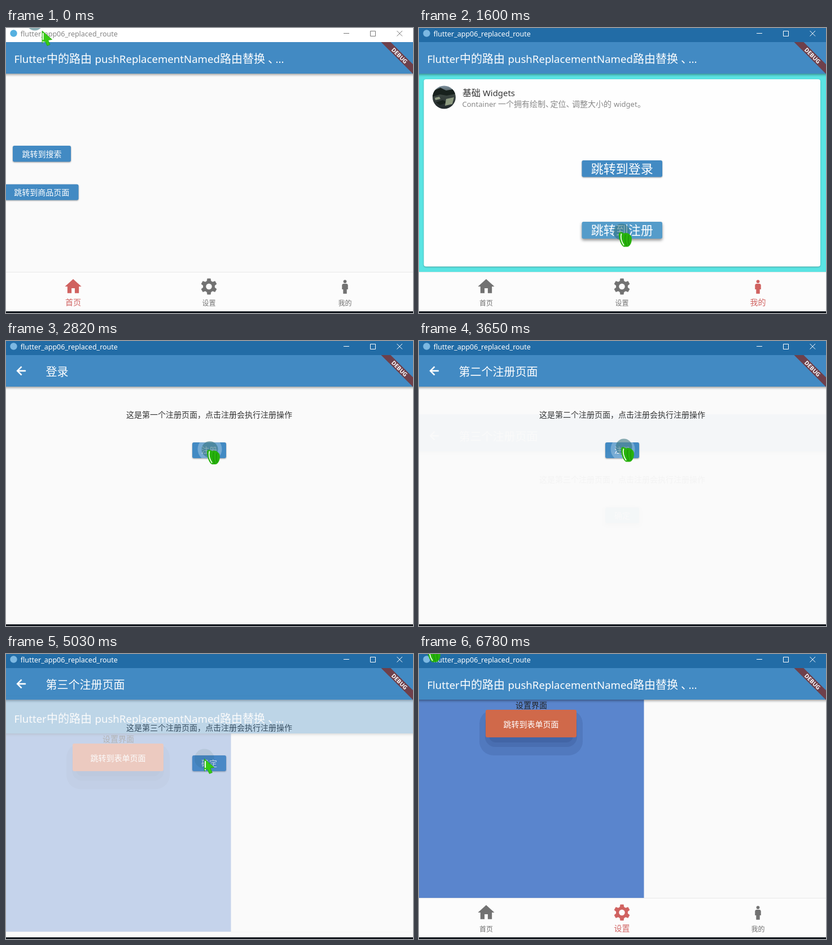
Animation, 721 px wide and 506 px high, one loop 7000 ms. Source, as an HTML page:

```html
<!DOCTYPE html>
<html lang="zh-CN">
<head>
<meta charset="utf-8">
<title>replaced route</title>
<style>
html, body { margin: 0; width: 100%; height: 100%; overflow: hidden; background: #fafafa; }
svg { display: block; width: 721px; height: 506px; }
text { font-family: "Noto Sans CJK SC", "Noto Sans CJK", "Noto Sans", sans-serif; font-weight: 350; white-space: pre; }
.lat { font-family: "Noto Sans", "Open Sans", sans-serif; font-weight: 400; }
.mid { text-anchor: middle; }
.bar { fill: #428ac3; filter: drop-shadow(0 2px 2px rgba(0,0,0,.38)); }
.btn { fill: #428ac3; filter: drop-shadow(0 1.5px 1.2px rgba(0,0,0,.38)); }
.press .hot { fill: #559cca; filter: drop-shadow(0 3px 2.5px rgba(0,0,0,.42)); }
.wave { fill: #fff; opacity: 0; }
.press .wave { opacity: .27; }
.frame rect { fill: #fff; }
.frame text { fill: #858585; }
.frame circle { fill: #55b0e0; }
.frame path { fill: none; stroke: #777; }
.active rect { fill: #226ca6; }
.active text { fill: #fff; }
.active circle { fill: #7cb8e2; }
.active path { stroke: #fff; }
</style>
</head>
<body>
<svg id="stage" viewBox="0 0 721 506">
  <defs>
    <clipPath id="body"><rect y="25" width="721" height="478"/></clipPath>
    <clipPath id="key"><rect x="330" y="180" width="60" height="28" rx="3"/></clipPath>
    <clipPath id="face"><circle cx="44.5" cy="123" r="20.5"/></clipPath>
    <linearGradient id="night" x2="0" y2="1">
      <stop offset="0" stop-color="#8195a4"/><stop offset=".4" stop-color="#3b4540"/>
      <stop offset="1" stop-color="#20272b"/>
    </linearGradient>
    <path id="home" d="M10 20v-6h4v6h5v-8h3L12 3 2 12h3v8z"/>
    <path id="tooth" d="M10.1 2.4h3.8l.8 4.4H9.3z" stroke="currentColor" stroke-width=".4" stroke-linejoin="round"/>
    <g id="gear"><circle cx="12" cy="12" r="5.4" fill="none" stroke="currentColor" stroke-width="3.6"/></g>
    <g id="man">
      <circle cx="12" cy="5.9" r="2"/>
      <path d="M14.2 20.8v-5.3h1.4v-5c0-1.2-.9-2-2-2h-3.2c-1.1 0-2 .8-2 2v5h1.4v5.3z"/>
    </g>
  </defs>

  <g id="pages" clip-path="url(#body)"></g>

  <g transform="translate(721 25) rotate(45)">
    <rect x="-40" y="28" width="80" height="12" fill="#6e404b"/>
    <text class="lat mid" y="37.7" font-size="10.2" style="font-weight:900" fill="#fff">DEBUG</text>
  </g>

  <g id="frame" class="frame">
    <rect width="721" height="25"/>
    <circle cx="13.5" cy="9.5" r="6.2"/>
    <text class="lat" x="25.7" y="14.5" font-size="12.5">flutter_app06_replaced_route</text>
    <path d="M598 9.5h10M645.5 5.500h9v9h-9zM692.500 5l9.500 9.500M702 5l-9.500 9.500"/>
  </g>
  <rect y="503" width="721" height="3" fill="#12171d"/>

  <circle id="halo"/>
  <g id="arrow">
    <path d="M0 0V22L5 18 9 26.500 14 24.500 10.500 16.500 17.500 15.500z" fill="#36cb14" stroke="#23a40a" stroke-width=".8"/>
    <path d="M1.700 4V16M1.700 18.500v2" stroke="#f2fff0" stroke-width="2"/>
  </g>
  <g id="hand">
    <path d="M0 3C2-1 6 0 9 3 12 0 20 3 22.500 9 24 16 21 26 15 26.500H9C3 24 0 12 0 3z" fill="#27b20c"/>
    <path d="M12 5C10 12 11 18 14 25M18 6C16 12 17 18 18 23" fill="none" stroke="#178a06"/>
    <path d="M4.500 3C2.500 10 5 18 9 24" fill="none" stroke="#ecffe8" stroke-width="1.800"/>
  </g>
</svg>
<script>
const $ = id => document.getElementById(id);
const LOOP = 7000;

const txt = (s, x, y, size, fill = '#fff', cls = '') =>
  `<text class="${cls}" x="${x}" y="${y}" font-size="${size}" fill="${fill}">${s}</text>`;
const box = (x, y, w, h, fill, r = 0, cls = '') =>
  `<rect class="${cls}" x="${x}" y="${y}" width="${w}" height="${h}" rx="${r}" fill="${fill}"/>`;
const button = (x, y, w, h, label, size, cls = '') =>
  box(x, y, w, h, '', 3, 'btn ' + cls) +
  txt(label, x + w / 2, y + h / 2 + size * .38, size, '#fff', 'mid');

const bar = box(-10, 15, 741, 66, '', 0, 'bar');
const mainBar = bar +
  txt('Flutter', 14.5, 61.5, 18.5, '#fff', 'lat') + txt('中的路由', 72, 61.5, 20) +
  txt('pushReplacementNamed', 157.5, 61.5, 18.6, '#fff', 'lat') +
  txt('路由替换', 379, 61.5, 20) + txt('、', 464, 61.5, 20) +
  txt('...', 477.5, 61.5, 18.6, '#fff', 'lat');

const tabs = [['home', '首页', 119], ['gear', '设置', 359.5], ['man', '我的', 600.5]];
const nav = active => box(0, 433, 721, 70, '#fcfcfc') + box(0, 433, 721, 1, '#e8e8e8') +
  tabs.map(([icon, label, x], i) => {
    const on = i === active, color = on ? '#d06260' : '#727272';
    return `<use href="#${icon}" transform="translate(${x - 17.5} 441.5) scale(1.458)" fill="${color}" color="${color}"/>` +
      txt(label, x, on ? 491.5 : 492.8, on ? 14 : 12, color, 'mid');
  }).join('');

const signUp = (title, nth, label, ripple) => bar +
  `<path transform="translate(14.700 41)" fill="#fff" stroke="#fff" stroke-width=".7"
    d="M20 11H7.830l5.590-5.590L12 4l-8 8 8 8 1.410-1.410L7.830 13H20z"/>` +
  txt(title, 70.5, 61.5, 20) +
  txt(`这是第${nth}个注册页面，点击注册会执行注册操作`, 213, 136, 14, '#333') +
  button(330, 180, 60, 28, label, 14, ripple ? '' : 'hot') +
  (ripple ? '<circle class="wave" cx="361" cy="192" r="21.500" clip-path="url(#key)"/>' : '');

const avatar = `<g clip-path="url(#face)">${box(24, 102, 41, 42, 'url(#night)')}
  <path d="M24 112l14-6 10 5 17-3v9l-16 3-12-2-13 4zM30 132l12-4 9 4-14 5z" fill="#18211d"/>
  <path d="M48 126l14-3-3 12-13 3zM28 124l8-2 2 4-9 2z" fill="#8d9a80"/></g>`;

const pages = {
  home: button(12, 209, 103, 28.5, '跳转到搜索', 14) +
    button(-2, 277.5, 130.5, 28, '跳转到商品页面', 14) + mainBar + nav(0),

  me: box(0, 81, 721, 352, '#5ae4e3') +
    `<g style="filter:drop-shadow(0 1px 1px rgba(0,0,0,.3))">${box(8.5, 91, 702.5, 332.5, '#fefefe', 4)}</g>` + avatar +
    txt('基础', 77, 121.3, 16, '#333') + txt('Widgets', 113, 121.3, 14.9, '#333', 'lat') +
    txt('Container', 76.5, 140.3, 13, '#888', 'lat') +
    txt('一个拥有绘制、', 140, 140.3, 14, '#888') + txt('定位、', 232.5, 140.3, 14, '#888') +
    txt('调整大小的', 271, 140.3, 14, '#888') + txt('widget', 345, 140.3, 13, '#888', 'lat') +
    txt('。', 387, 140.3, 14, '#888') +
    button(288.5, 235, 142.5, 29.5, '跳转到登录', 22) +
    button(288.5, 344, 142.5, 30, '跳转到注册', 22, 'hot') + mainBar + nav(2),

  reg1: signUp('登录', '一', '注册', true),
  reg2: signUp('第二个注册页面', '二', '注册', true),
  reg3: signUp('第三个注册页面', '三', '确定', false),

  set: box(0, 81, 398.5, 352, '#5a85cd') +
    [[107, 99, 183, 81, 25], [117, 103, 163, 62, 18], [124, 110, 149, 47, 12]]
      .map(([x, y, w, h, r]) => box(x, y, w, h, 'rgba(20,35,80,.12)', r)).join('') +
    txt('设置界面', 171, 95.5, 14, '#222') + box(118, 99, 161, 49, '#d0694a', 3) +
    txt('跳转到表单页面', 149.5, 129.8, 14) + mainBar + nav(1)
};

for (let a = 0; a < 360; a += 60)
  $('gear').innerHTML += `<use href="#tooth" transform="rotate(${a} 12 12)"/>`;
$('pages').innerHTML = Object.entries(pages).map(([id, html]) =>
  `<g id="p-${id}">${box(0, 25, 721, 478, '#fafafa')}${html}</g>`).join('');

const ticks = [0, 160, 366, 572, 778, 984, 1190, 1410, 1600, 1800, 2000, 2220, 2420, 2620, 2826,
  3032, 3238, 3444, 3650, 3840, 4040, 4240, 4440, 4640, 4840, 5030, 5230, 5460, 6340, 6560, 6780];
const clicks = [778, 1600, 2620, 3650, 4840, 6780];

// time, page below, page sliding in, progress of the slide
const routes = [
  [0, 'home'], [984, 'me'], [1800, 'me', 'reg1', .5], [2000, 'reg1'],
  [2826, 'reg1', 'reg2', .5], [3032, 'reg2'], [3650, 'reg2', 'reg3', .04],
  [3840, 'reg2', 'reg3', .5], [4040, 'reg3'], [5030, 'reg3', 'set', .5], [5230, 'set']
];

// time, x, y of the pointer
const path = [
  [0, 64, 5], [160, 80, 22], [572, 480, 390], [778, 600, 466], [984, 588, 458], [1410, 366, 372],
  [1600, 359, 362], [1800, 352, 318], [2000, 339, 248], [2220, 350, 215], [2420, 361, 193],
  [3444, 361, 191], [3650, 363, 188], [4040, 361, 190], [4640, 352, 186], [5230, 351, 186],
  [6200, 351, 186], [6780, 20, -12]
];

const last = (list, test) => list.filter(test).pop();

function pointer(t) {
  const i = Math.max(1, path.findIndex(k => k[0] >= t));
  const [a, b] = [path[i - 1], path[i]];
  const k = Math.max(0, (t - a[0]) / (b[0] - a[0]));
  return [a[1] + (b[1] - a[1]) * k, a[2] + (b[2] - a[2]) * k];
}

function attrs(el, map) {
  for (const k in map) el.setAttribute(k, map[k]);
}

function show(t) {
  const [, under, over, p] = last(routes, r => r[0] <= t);
  for (const id in pages) {
    const moving = id === over;
    attrs($('p-' + id), {
      display: moving || id === under ? 'inline' : 'none',
      opacity: moving ? p * .65 : 1,
      transform: `translate(0 ${moving ? 120 * (1 - p) : 0})`
    });
  }
  const down = clicks.includes(t), lit = down || t === 0;
  $('stage').classList.toggle('press', down);
  $('frame').classList.toggle('active', t > 0);

  const [x, y] = pointer(t);
  const [hx, hy] = t === 0 ? [51, -10] : down ? [x, y] : pointer(t - 17);
  attrs($('halo'), {
    cx: hx, cy: hy, r: lit ? 14.5 : 17.5,
    fill: lit ? 'rgba(45,110,120,.55)' : 'rgba(0,50,30,.08)'
  });
  attrs($('arrow'), { display: down ? 'none' : 'inline', transform: `translate(${x} ${y})` });
  attrs($('hand'), { display: down ? 'inline' : 'none', transform: `translate(${x - 5} ${y})` });
}

const start = performance.now();
let shown = -1;
function loop() {
  const now = (performance.now() - start) % LOOP;
  const tick = last(ticks, t => t <= now);
  if (tick !== shown) show(shown = tick);
  requestAnimationFrame(loop);
}
loop();
</script>
</body>
</html>
```
